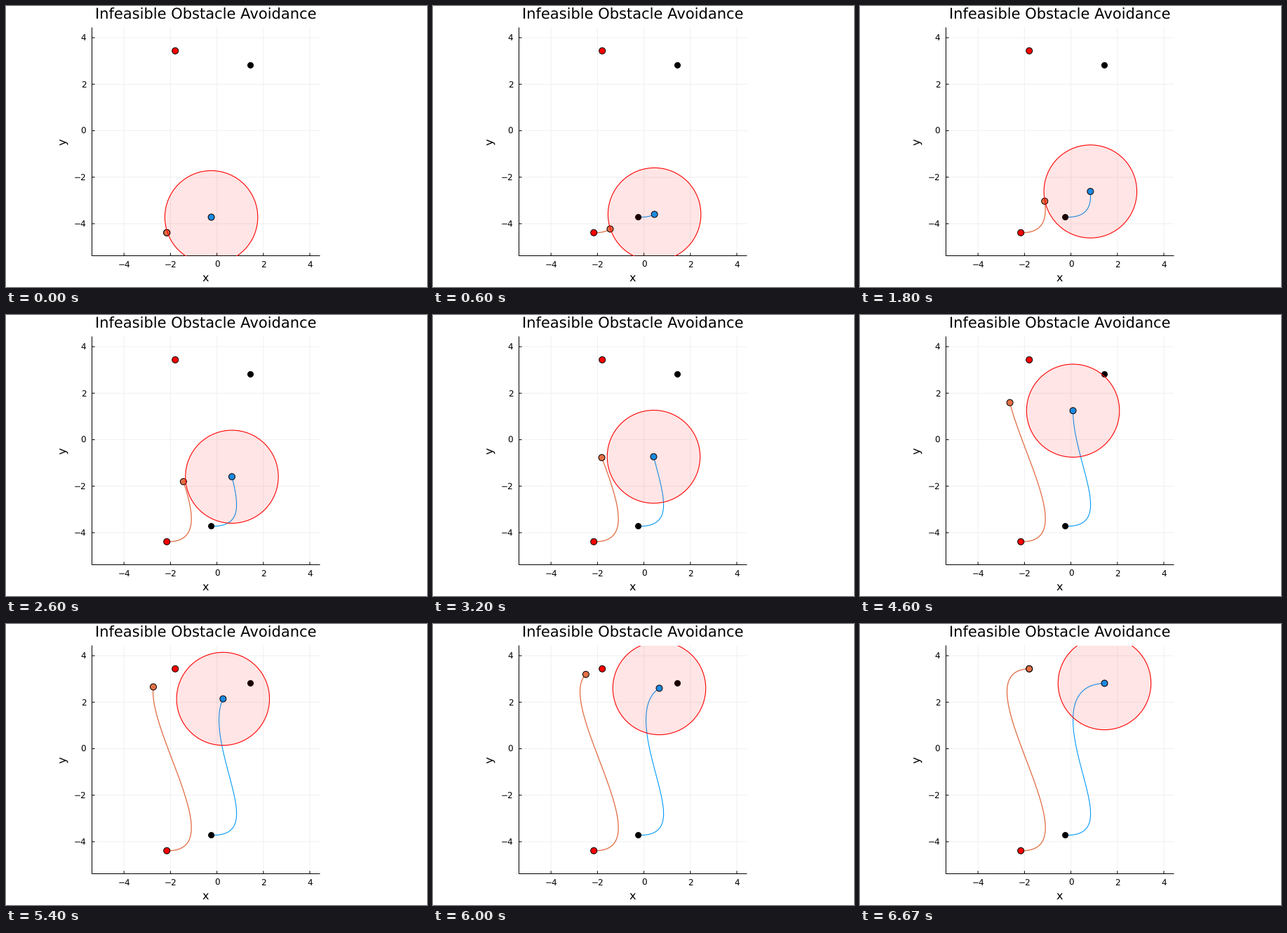
Recreate the animation shown at these times as a matplotlib script. Size 600 by 400 pixels, loop 6740 ms.

```python
import numpy as np
import matplotlib.pyplot as plt
from matplotlib.animation import FuncAnimation
from matplotlib.patches import Circle, Rectangle

plt.rcParams.update({"text.hinting": "none", "text.hinting_factor": 1,
                     "font.family": "DejaVu Sans"})

W, H, DPI = 600, 400, 100
PT = 72 / DPI                       # points per pixel
LOOP_MS, TICK_MS = 6740, 20
STEPS, RATE = 100, 15               # motion steps, and how many per second
UNIT, X0, Y0 = 33.1, 300.6, 177.5   # pixels per data unit, place of (0, 0)
LEFT, TOP, RIGHT, BOTTOM = 122.5, 30.5, 447.5, 355.5

RED, BLUE, ORANGE = "#ff0000", "#009afa", "#e26f46"


def glide(start, end, slope, bulge, power=1):
    """Cubic with equal end slopes, pushed aside by a symmetric hump."""
    t = np.linspace(0, 1, STEPS + 1)
    hump = 4 * t * (1 - t)
    return (start + (end - start) * t * t * (3 - 2 * t)
            + slope * t * (1 - t) * (1 - 2 * t) + bulge * hump ** power)


# both agents leave and arrive heading right at the same speed
SPEED = 10 * UNIT
lead = glide(292.6, 348.5, SPEED, -7.75, 2.5), glide(300.6, 84.4, 0, 2.75)
chase = glide(229.2, 241.2, SPEED, 2.4), glide(322.7, 63.8, 0, 2)

fig = plt.figure(figsize=(W / DPI, H / DPI), dpi=DPI, facecolor="white")
ax = fig.add_axes([0, 0, 1, 1])
ax.set_xlim(0, W)
ax.set_ylim(H, 0)
ax.axis("off")
frame = Rectangle((LEFT, TOP), RIGHT - LEFT, BOTTOM - TOP, transform=ax.transData)


def line(xs, ys, color, width=1, z=1):
    return ax.plot(xs, ys, color=color, lw=width * PT, zorder=z,
                   solid_capstyle="butt", snap=False)[0]


def label(x, y, text, px, ha="center", va="baseline", **kw):
    ax.text(x, y, text, fontsize=px * PT, ha=ha, va=va, **kw)


def dot(pos, color, z, r=4.5):
    return ax.add_patch(Circle(pos, r, fc=color, ec="black", lw=PT, zorder=z))


# grid, ticks and tick labels
for v in range(-4, 5, 2):
    x, y = X0 + UNIT * v, Y0 - UNIT * v
    name = str(v).replace("-", "\u2212")
    line([x, x], [TOP, BOTTOM], "#f0f0f0", z=0)
    line([LEFT, RIGHT], [y, y], "#f0f0f0", z=0)
    line([x, x], [BOTTOM - 4, BOTTOM], "black")
    line([LEFT, LEFT + 4], [y, y], "black")
    label(x, 371.7, name, 11.8)
    label(114.3, y + 4.3, name, 11.8, ha="right")

line([LEFT, LEFT], [TOP, BOTTOM + .5], "black")
line([LEFT - .5, RIGHT], [BOTTOM, BOTTOM], "black")

label(284.3, 18.3, "Infeasible Obstacle Avoidance", 20.75)
label(284.6, 391.8, "x", 16.3)
label(82, 193, "y", 16.3, va="center", rotation=90)

# fixed end points, then the trail and the moving dot of each agent
agents = []
for (x, y), color, width, end_color, end_r in (
        (lead, BLUE, 1.1, "black", 4), (chase, ORANGE, 1.3, RED, 4.5)):
    for end in (0, -1):
        dot((x[end], y[end]), end_color, 3, end_r)
    agents.append((x, y, line([], [], color, width, 2),
                   dot((x[0], y[0]), color, 4)))

disc = ax.add_patch(Circle((0, 0), 2 * UNIT, fc=(1, 0, 0, .1),
                           ec=RED, lw=1.1 * PT, zorder=5))
disc.set_clip_path(frame)


def update(i):
    # look slightly ahead, so a step never shows late
    ms = TICK_MS * i + 15
    k = min(STEPS, ms * RATE // 1000)
    for x, y, trail, agent in agents:
        trail.set_data(x[:k + 1], y[:k + 1])
        agent.center = x[k], y[k]
    disc.center = lead[0][k], lead[1][k]
    return [disc]


anim = FuncAnimation(fig, update, frames=LOOP_MS // TICK_MS, interval=TICK_MS,
                     init_func=lambda: update(0), repeat=True, repeat_delay=0)
plt.show()
```
